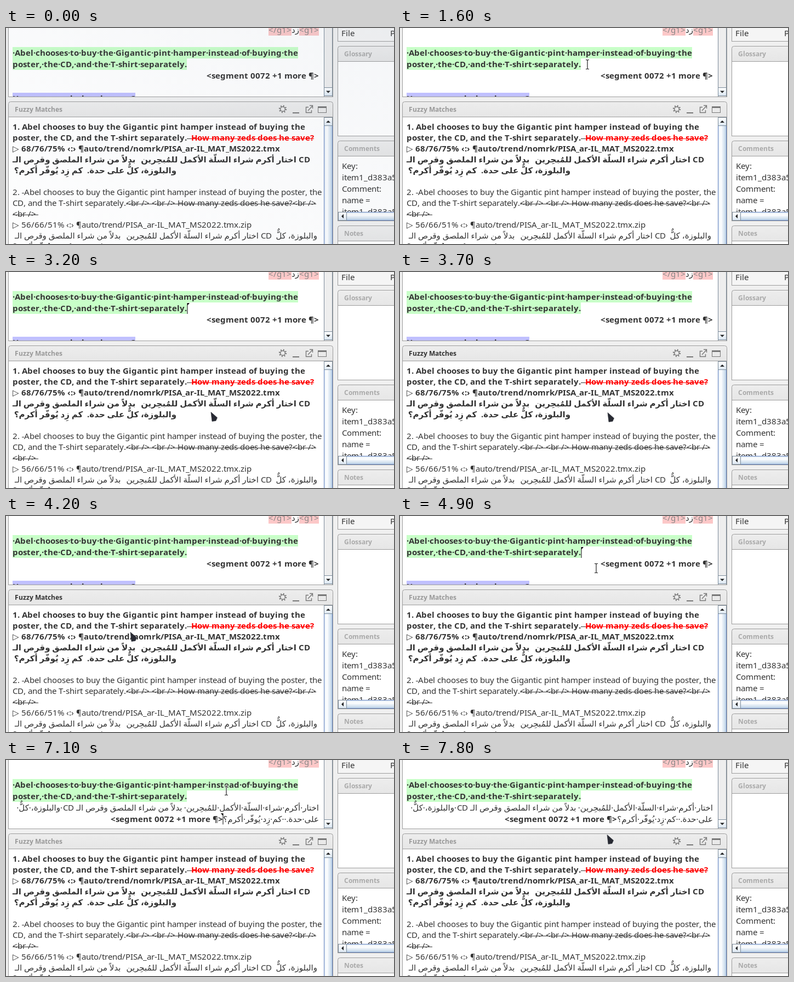
Recreate the animation shown at these times as an HTML page. Size 708 by 397 pixels, loop 8 s.

```html
<!DOCTYPE html>
<html lang="en">
<head>
<meta charset="utf-8">
<title>Fuzzy match insertion</title>
<style>
  html, body { margin: 0; width: 100%; height: 100%; overflow: hidden; background: #f0f0f0; }
  svg { display: block; width: 708px; height: 397px; }
  text { font-family: "Noto Sans", "DejaVu Sans", sans-serif; white-space: pre; }
  rect { shape-rendering: crispEdges; }
</style>
</head>
<body>
<script>
const NS = 'http://www.w3.org/2000/svg';
const INK = '#333', EDGE = '#9c9c9c', ICON = '#777', TRACK = '#7a8a99';
const LOOP = 8000, STEP = 100;

function el(parent, tag, attrs = {}, text) {
  const node = document.createElementNS(NS, tag);
  for (const key in attrs) node.setAttribute(key, attrs[key]);
  if (text !== undefined) node.textContent = text;
  parent.appendChild(node);
  return node;
}
const svg = el(document.body, 'svg', { viewBox: '0 0 708 397' });
const group = () => el(svg, 'g');
const box = (parent, x, y, width, height, fill) => el(parent, 'rect', { x, y, width, height, fill });
const path = (parent, d, attrs) => el(parent, 'path', { d, fill: 'none', ...attrs });

// Glyph advances snap to whole pixels, as in a desktop toolkit.
const pen = document.createElement('canvas').getContext('2d');
function put(parent, x, y, str, { bold = false, size = 15, fill = INK, strike = false } = {}) {
  pen.font = `${bold ? 700 : 400} ${size}px "Noto Sans", "DejaVu Sans", sans-serif`;
  const xs = [];
  let end = x;
  for (const ch of str) {
    xs.push(end);
    end += Math.round(Math.round(pen.measureText(ch).width * 64) / 64);
  }
  const node = el(parent, 'text', {
    x: xs.join(' '), y, fill, 'font-size': size, 'font-weight': bold ? 700 : 400
  }, str);
  if (strike) box(parent, x, y - 4, end - x, 1, fill);
  return { end, node };
}

// Right-to-left text, pinned at its right or left edge.
function arabic(parent, x, y, str, { bold = false, pin = 'right' } = {}) {
  el(parent, 'text', {
    x, y, fill: INK, 'font-size': 15, 'font-weight': bold ? 700 : 400,
    direction: 'rtl', 'text-anchor': pin === 'right' ? 'start' : 'end'
  }, str);
}
const dots = str => str.replace(/ /g, '·');

function gradient(id, vertical, stops) {
  const g = el(svg, 'linearGradient', { id, x2: vertical ? 0 : 1, y2: vertical ? 1 : 0 });
  stops.forEach((c, i) => el(g, 'stop', { offset: i / (stops.length - 1), 'stop-color': c }));
}
const thumb = ['#dde8f3', '#ffffff', '#dde8f3', '#b8cfe5'];
gradient('thumbX', false, thumb);
gradient('thumbY', true, thumb);
gradient('button', true, ['#ffffff', '#dde8f3']);
gradient('bar', true, ['#ededed', '#e6e6e6']);

function arrowButton(parent, x, y, d) {
  el(parent, 'rect', { x: x + .5, y: y + .5, width: 15, height: 15, fill: 'url(#button)', stroke: TRACK });
  path(parent, d, { fill: '#222' });
}
function track(parent, y, h) {
  box(parent, 580, y, 16, h, '#eee');
  box(parent, 580, y, 1, h, TRACK);
  box(parent, 595, y, 1, h, TRACK);
}

function pane(parent, x, y, w, h, title, titleX, titleFill) {
  const head = 29;
  path(parent, `M${x + .5} ${y + head}V${y + 4.5}q0-4 4-4H${x + w - 4.5}q4 0 4 4V${y + head}Z`,
    { fill: 'url(#bar)', stroke: EDGE });
  el(parent, 'rect', { x: x + .5, y: y + head - .5, width: w - 1, height: h - head, fill: '#fff', stroke: EDGE });
  return put(parent, titleX, y + 19, title, { bold: true, size: 12, fill: titleFill }).node;
}

const who = 'Abel', what = 'Gigantic pint hamper';
const whoAr = 'أكرم', whatAr = 'السلّة الأكمل للمُبحِرين';
const ask = 'How many zeds does he save?';
const lineA = `${who} chooses to buy the ${what} instead of buying the`;
const lineB = 'poster, the CD, and the T-shirt separately.';
const arStart = `اختار ${whoAr} شراء ${whatAr}`;
const arRest = 'بدلاً من شراء الملصق وقرص الـ';
const arBlouse = 'والبلوزة، كلٌّ';
const arEnd = `على حدة.  كم زِد يُوفّر ${whoAr}؟`;
const marker = '<segment 0072 +1 more ¶>';
const B = { bold: true }, LEFT = { pin: 'left' }, TAG = { fill: '#888' };

// Editor
const editor = group();
box(editor, 4, 0, 593, 127, '#fff');
box(editor, 479, 0, 42, 14, '#fcc8c8');
box(editor, 535, 0, 36, 14, '#fcc8c8');
put(editor, 479, 9, '</g1>', TAG);
arabic(editor, 535, 9, 'زد');
put(editor, 535, 9, '<g1>', TAG);
box(editor, 12, 35, 521, 21, '#c8ffc8');
box(editor, 12, 56, 318, 21, '#c8ffc8');
put(editor, 12, 51, dots(' ' + lineA), B);
put(editor, 12, 72, dots(lineB), B);

const before = group();
put(before, 366, 93, marker, B);
box(before, 12, 119, 224, 8, '#c0c0ff');
put(before, 12, 135, dots(ask), B);

const after = group();
arabic(after, 571, 93, dots(arStart + ' '));
arabic(after, 128, 93, arRest, LEFT);
put(after, 104, 93, 'CD');
arabic(after, 103, 93, dots(` ${arBlouse} `));
arabic(after, 571, 114, dots(arEnd));
put(after, 191, 114, marker, B);

const caretLtr = path(svg, 'M330 57H335L331.5 61V77H330.5V57Z', { fill: '#000' });
const caretRtl = path(svg, 'M397 98H392L395.5 102V118.5H396.5V98Z', { fill: '#000' });

// Everything around and below the editor text
const ui = group();
box(ui, 0, 127, 600, 270, '#f0f0f0');
box(ui, 4, 0, 1, 127, EDGE);
box(ui, 4, 126, 593, 1, EDGE);
track(ui, 0, 126);
box(ui, 596, 0, 1, 127, EDGE);
arrowButton(ui, 580, 109, 'M584 115.5H592L588 119.5Z');

// Fuzzy matches
const fuzzyTitle = pane(ui, 4, 135, 593, 280, 'Fuzzy Matches', 16, '#999');
const line = { stroke: ICON, 'stroke-width': 1.4 };
el(ui, 'circle', { cx: 505, cy: 149, r: 4.3, fill: 'none', ...line });
el(ui, 'circle', { cx: 505, cy: 149, r: 6, fill: 'none', stroke: ICON, 'stroke-width': 2.4,
  'stroke-dasharray': '1.9 2.81' });
box(ui, 523, 155, 12, 2, ICON);
path(ui, 'M552 145.5H547.5V155.5H557.5V151M551 152L559 143.5M554 142.5H559.5V148', line);
el(ui, 'rect', { x: 569.5, y: 144.5, width: 15, height: 11, fill: 'none', stroke: ICON });
box(ui, 569, 144, 16, 3, ICON);

track(ui, 164, 233);
el(ui, 'rect', { x: 580.5, y: 179.5, width: 15, height: 240, fill: 'url(#thumbX)', stroke: '#6382bf' });
arrowButton(ui, 580, 164, 'M584 174H592L588 170Z');

put(ui, 12, 187, '1. ' + lineA, B);
let x = put(ui, 12, 207, lineB, B).end;
x = put(ui, x, 207, '  ', { bold: true, strike: true }).end;
put(ui, x, 207, ask, { bold: true, strike: true, fill: '#f00' });
put(ui, 12, 227, '▷ 68/76/75% ‹:› ¶auto/trend/nomrk/PISA_ar-IL_MAT_MS2022.tmx', B);
arabic(ui, 530, 247, arStart, B);
arabic(ui, 12, 247, arRest, { ...B, ...LEFT });
put(ui, 534, 247, 'CD', B);
arabic(ui, 311, 267, `${arBlouse} ${arEnd}`, B);

x = put(ui, 12, 307, '2. ').end;
x = put(ui, x, 307, ' ', { strike: true }).end;
put(ui, x, 307, lineA + ' poster, the');
x = put(ui, 12, 327, lineB.slice(12)).end;
put(ui, x, 327, `<br /> <br /> ${ask}<br />`, { strike: true });
put(ui, 12, 347, '<br /> ', { strike: true });
put(ui, 12, 367, '▷ 56/66/51% ‹:› ¶auto/trend/PISA_ar-IL_MAT_MS2022.tmx.zip');
arabic(ui, 461, 387, arStart);
arabic(ui, 16, 387, arRest, LEFT);
put(ui, 465, 387, 'CD');
arabic(ui, 568, 387, arBlouse);
arabic(ui, 12, 407, arEnd, LEFT);

// Right column
box(ui, 597, 0, 111, 397, '#f0f0f0');
box(ui, 605, 0, 103, 25, '#f5f5f5');
box(ui, 605, 0, 1, 25, EDGE);
box(ui, 605, 24, 103, 1, EDGE);
put(ui, 612, 15, 'File');
put(ui, 701, 15, 'P');
pane(ui, 605, 33, 130, 166, 'Glossary', 617, '#aaa');
pane(ui, 605, 207, 130, 148, 'Comments', 617, '#aaa');
['Key:', 'item1_d383a5', 'Comment:', 'name =', 'item1_d383a5'].forEach((s, i) =>
  put(ui, 613, 259 + 21 * i, s));
box(ui, 606, 338, 102, 16, '#eee');
el(ui, 'rect', { x: 621.5, y: 338.5, width: 120, height: 15, fill: 'url(#thumbY)', stroke: '#6382bf' });
arrowButton(ui, 606, 338, 'M616 342V350L612 346Z');
box(ui, 605, 354, 103, 1, EDGE);
pane(ui, 605, 363, 130, 60, 'Notes', 617, '#aaa');

// Faint tint while the window settles, strongest at the top right
const fade = el(svg, 'linearGradient', { id: 'fade', x1: 0, y1: 1, x2: 1, y2: 0 });
el(fade, 'stop', { offset: 0, 'stop-color': '#6e82a0', 'stop-opacity': .01 });
el(fade, 'stop', { offset: 1, 'stop-color': '#6e82a0', 'stop-opacity': .07 });
const tint = box(svg, 0, 0, 708, 397, 'url(#fade)');

// Pointer
const arrow = path(svg, 'M0 -.5L11.5 9.7L9 15.5L2 16.5Z',
  { fill: '#282a33', stroke: '#282a33', 'stroke-width': .6, 'stroke-linejoin': 'round' });
const beam = group();
const beamShape = 'M-3 -8.5H-1L0 -7.5L1 -8.5H3M0 -7.5V7.5M-3 8.5H-1L0 7.5L1 8.5H3';
path(beam, beamShape, { stroke: '#fff', 'stroke-width': 3 });
path(beam, beamShape, { stroke: '#222', 'stroke-width': 1.2 });

// time, x, y
const moves = [
  [500, 128, 4], [700, 190, 60], [900, 262, 107], [1100, 342, 67],
  [1800, 342, 67], [2200, 568, 81], [2600, 568, 81], [2700, 488, 25],
  [2900, 488, 25], [3200, 374, 258], [3800, 380, 259], [3900, 386, 271],
  [4100, 150, 187], [4200, 227, 214], [4300, 227, 214], [5100, 402, 56],
  [7200, 402, 56], [7400, 470, 43], [7500, 488, 50], [7800, 378, 138], [LOOP, 378, 138]
];
function pointerAt(t) {
  const i = moves.findIndex(m => m[0] > t);
  const [t0, x0, y0] = moves[i - 1], [t1, x1, y1] = moves[i];
  const k = (t - t0) / (t1 - t0);
  return [Math.round(x0 + (x1 - x0) * k), Math.round(y0 + (y1 - y0) * k)];
}

const show = (node, on) => node.setAttribute('visibility', on ? 'visible' : 'hidden');
const within = (t, a, b) => t >= a && t < b;

function draw(time) {
  const t = Math.floor(time % LOOP / STEP) * STEP;
  const inserted = t >= 6000;
  show(before, !inserted);
  show(after, inserted);
  show(tint, t < 1600);
  show(caretLtr, within(t, 2200, 2700) || within(t, 3200, 3600) ||
    within(t, 4900, 5400) || within(t, 5900, 6000));
  show(caretRtl, within(t, 6000, 6500) || within(t, 7100, 7600));
  fuzzyTitle.setAttribute('fill', within(t, 3600, 4900) ? INK : '#999');

  const visible = t >= 500;
  const [px, py] = visible ? pointerAt(t) : [0, 0];
  const overText = py < 126;
  show(beam, visible && overText);
  show(arrow, visible && !overText);
  (overText ? beam : arrow).setAttribute('transform', `translate(${px} ${py})`);
}

const start = performance.now();
function tick() {
  draw(performance.now() - start);
  requestAnimationFrame(tick);
}
tick();
</script>
</body>
</html>
```
